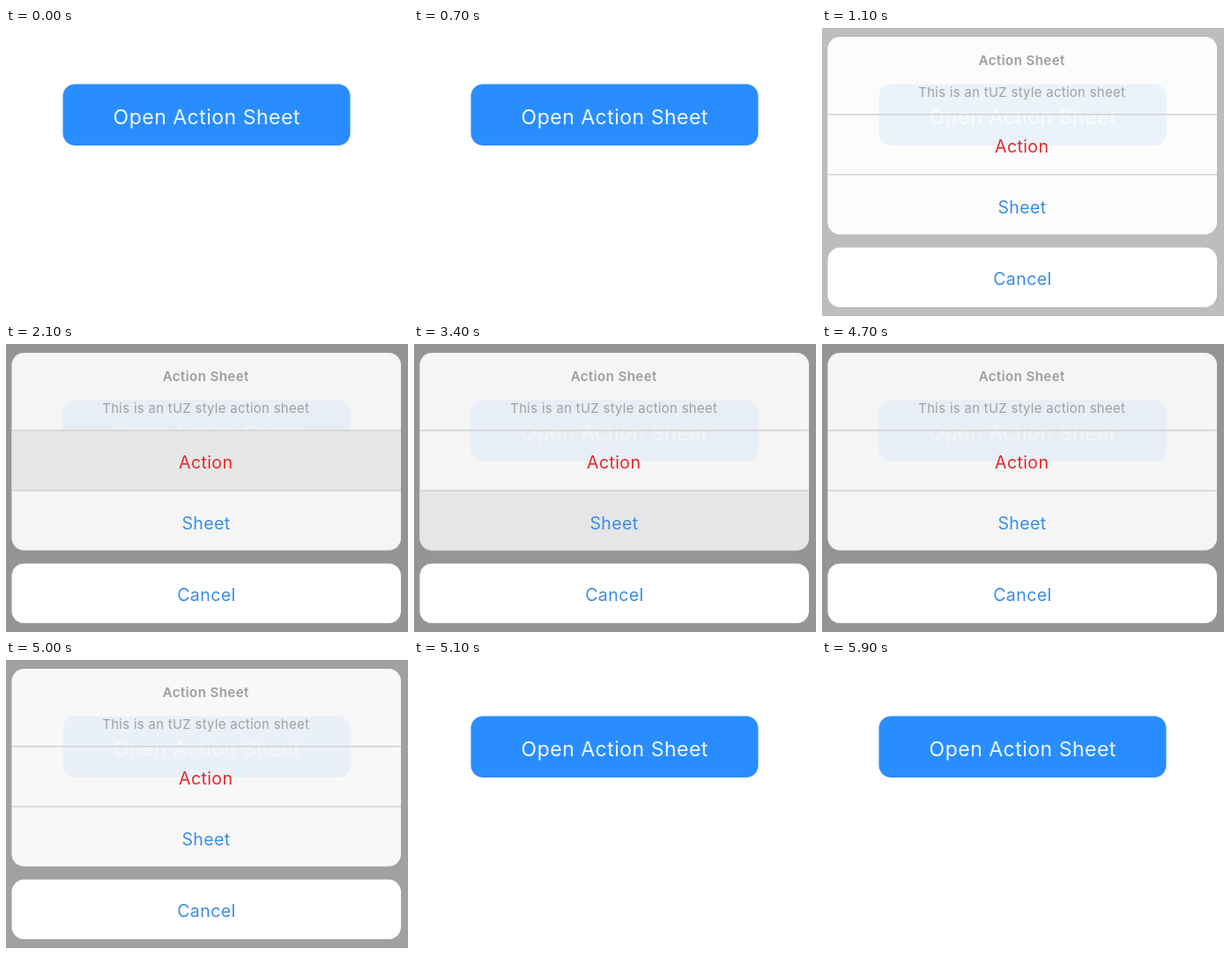
Write an HTML page that moves like this. It is 456 px wide and 326 px high and loops after 6000 ms.

```html
<!DOCTYPE html>
<html lang="en">
<head>
<meta charset="utf-8">
<title>Action sheet</title>
<style>
  html, body { margin: 0; width: 100%; height: 100%; overflow: hidden; background: #fff; }
  svg { display: block; width: 100vw; height: 100vh; }
  text { font-family: Inter, Roboto, sans-serif; text-anchor: middle; }
  .open { font-size: 23px; letter-spacing: .5px; fill: #eef8ff; }
  .title { font-size: 15px; font-weight: 600; letter-spacing: .45px; fill: #9d9d9d; }
  .note { font-size: 14.8px; letter-spacing: .35px; fill: #a0a0a0; }
  .row { font-size: 19.5px; letter-spacing: .4px; fill: #3a8de4; }
  .row.danger { fill: #e6262c; }
  .line { fill: #d4d4d5; }
</style>
</head>
<body>
<svg viewBox="0 0 456 326">
  <defs>
    <g id="button">
      <rect x="64.5" y="63.5" width="326" height="69.5" rx="14" fill="#2a8dff"/>
      <text class="open" x="227.7" y="109">Open Action Sheet</text>
    </g>
    <clipPath id="panel">
      <rect id="panelShape" x="6.5" y="10" width="441.5" height="223.5" rx="14"/>
    </clipPath>
  </defs>

  <rect width="456" height="326" fill="#fff"/>
  <use id="trigger" href="#button"/>
  <rect id="backdrop" width="456" height="326"/>

  <g id="behind" clip-path="url(#panel)">
    <rect width="456" height="326" fill="#fff"/>
    <use href="#button"/>
    <rect id="tint" width="456" height="326"/>
  </g>

  <g id="sheet">
    <rect x="6.5" y="10" width="441.5" height="223.5" rx="14" fill="#fff" fill-opacity=".9"/>
    <rect id="highlight" x="6.5" width="441.5" height="68" fill="#e6e6e6" clip-path="url(#panel)"/>
    <rect class="line" x="6.5" y="97" width="441.5" height="1.6"/>
    <rect class="line" x="6.5" y="165.2" width="441.5" height="1.6"/>
    <text class="title" x="226.7" y="41.5">Action Sheet</text>
    <text class="note" x="226.7" y="77.5">This is an tUZ style action sheet</text>
    <text class="row danger" x="226.7" y="140.5">Action</text>
    <text class="row" x="227" y="209.5">Sheet</text>
    <rect x="6.5" y="248.5" width="441.5" height="67.5" rx="14" fill="#fff"/>
    <text class="row" x="227.4" y="290.5">Cancel</text>
  </g>
</svg>
<script>
  const LOOP = 6000, DIM = 0.416, TRAVEL = 326;
  const el = id => document.getElementById(id);
  const set = (id, name, value) => el(id).setAttribute(name, value);
  const progress = (t, from, to) => Math.min(1, Math.max(0, (t - from) / (to - from)));
  const easeOut = p => 1 - (1 - p) ** 3;
  const smooth = p => p * p * (3 - 2 * p);

  // Row presses: start, end, top of the highlighted row
  const presses = [[2100, 2500, 98], [3400, 3800, 166]];

  function draw(t) {
    const press = smooth(progress(t, 70, 250)) - smooth(progress(t, 430, 700));
    set("trigger", "opacity", 1 - 0.65 * press);

    const fade = progress(t, 770, 1300) - progress(t, 4950, 5100) ** 2;
    set("backdrop", "opacity", DIM * fade);
    set("tint", "opacity", DIM * fade ** 3);

    const shift = TRAVEL * (1 - easeOut(progress(t, 770, 1080)) + progress(t, 5000, 5100) ** 2);
    set("sheet", "transform", `translate(0 ${shift})`);
    set("panelShape", "y", 10 + shift);

    const active = presses.find(([from, to]) => t >= from && t < to);
    set("highlight", "opacity", active ? 1 : 0);
    if (active) set("highlight", "y", active[2]);
  }

  const start = performance.now();
  function tick() {
    draw((performance.now() - start) % LOOP);
    requestAnimationFrame(tick);
  }
  draw(0);
  requestAnimationFrame(tick);
</script>
</body>
</html>
```
